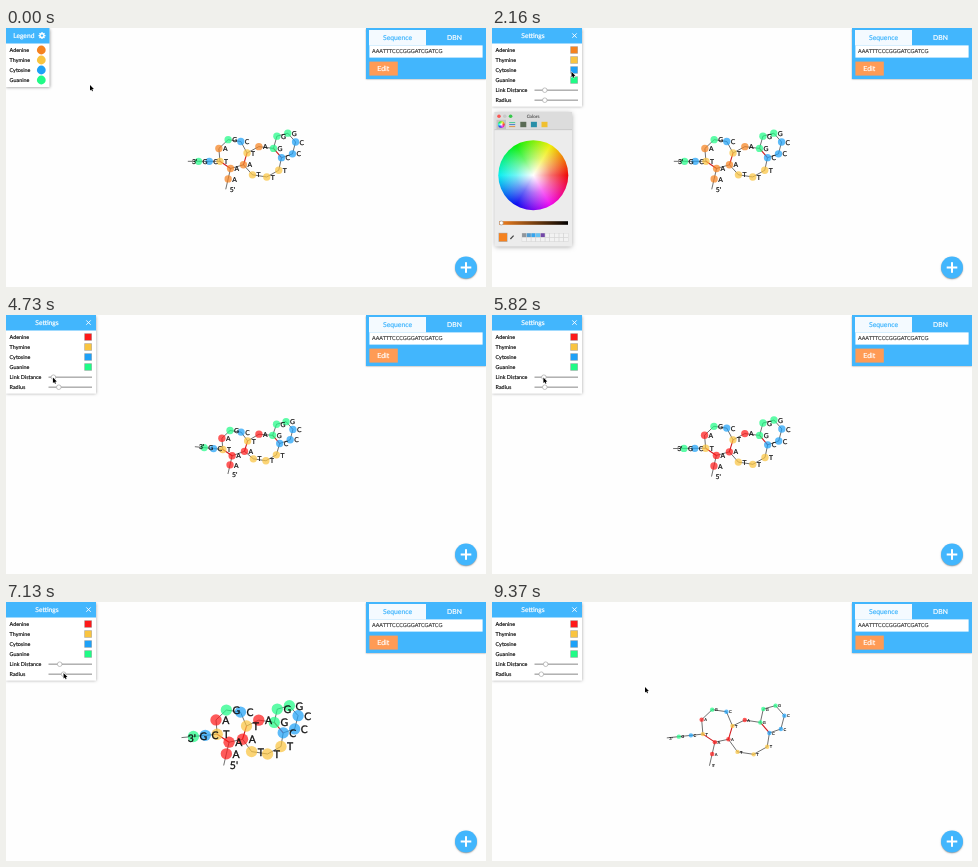
Write an HTML page with a canvas that moves like this. It is 480 by 259 pixels and loops after 9.39 s.

```html
<!DOCTYPE html>
<html lang="en">
<head>
<meta charset="utf-8">
<title>Sequence viewer</title>
<style>
  html, body { margin: 0; width: 100%; height: 100%; overflow: hidden; background: #fefefe; }
  canvas { display: block; width: 480px; height: 259px; }
</style>
</head>
<body>
<canvas id="stage"></canvas>
<script>
const LOOP = 9390;
const canvas = document.getElementById('stage');
const ctx = canvas.getContext('2d');
const scale = window.devicePixelRatio || 1;
canvas.width = 480 * scale;
canvas.height = 259 * scale;
ctx.textRendering = 'geometricPrecision';

const BLUE = '#42b6fd';
const SEQUENCE = 'AAATTTCCCGGGATCGATCG';
const LABELS = ["5'", ...SEQUENCE, "3'"];
const PAIRS = [[2, 18], [3, 14], [7, 12]];
const COLORS = { T: '#f9c440', C: '#1ea1f7', G: '#20fb86' };
const BASES = [['Adenine', 'A'], ['Thymine', 'T'], ['Cytosine', 'C'], ['Guanine', 'G']];

// Each loop of the folded strand is a regular polygon on an ellipse.
// Neighbouring loops share the two bases of a pair; drift is the shift per unit of spread.
const LOOPS = [
  { x: 226.6, y: 125.8, rx: 14.7, ry: 14.8, start: 98, drift: [-1.4, -2.2], bases: [2, 3, 14, 15, 16, 17, 18] },
  { x: 256.8, y: 133.8, rx: 19, ry: 15.5, start: 168, drift: [0.4, 1.4], bases: [3, 4, 5, 6, 7, 12, 13, 14] },
  { x: 278.7, y: 117, rx: 11.2, ry: 12.3, start: 106, drift: [1.4, 0], bases: [7, 8, 9, 10, 11, 12] }
];

const mix = (a, b, u) => a + (b - a) * u;

// Smooth progress from 0 to 1 between two times.
function ease(t, from, to) {
  const u = Math.min(1, Math.max(0, (t - from) / (to - from)));
  return u * u * (3 - 2 * u);
}

function polar(x, y, degrees, rx, ry = rx) {
  const a = degrees * Math.PI / 180;
  return [x + rx * Math.cos(a), y + ry * Math.sin(a)];
}

function rect(x, y, w, h, fill) {
  ctx.fillStyle = fill;
  ctx.fillRect(x, y, w, h);
}

function disc(x, y, r, fill, stroke) {
  ctx.beginPath();
  ctx.arc(x, y, r, 0, Math.PI * 2);
  ctx.fillStyle = fill;
  ctx.fill();
  if (stroke) {
    ctx.strokeStyle = stroke;
    ctx.lineWidth = 0.6;
    ctx.stroke();
  }
}

function line(points, color, width) {
  ctx.beginPath();
  points.forEach(([x, y]) => ctx.lineTo(x, y));
  ctx.strokeStyle = color;
  ctx.lineWidth = width;
  ctx.stroke();
}

function text(str, x, y, size, color, align = 'left') {
  ctx.font = `${size}px Lato, sans-serif`;
  ctx.textAlign = align;
  ctx.fillStyle = ctx.strokeStyle = color;
  ctx.lineWidth = size * 0.03;
  ctx.fillText(str, x, y + size * 0.36);
  ctx.strokeText(str, x, y + size * 0.36);
}

function shadowed(draw, blur) {
  ctx.save();
  ctx.shadowColor = 'rgba(0,0,0,.4)';
  ctx.shadowBlur = blur * scale;
  ctx.shadowOffsetY = 0.7 * scale;
  draw();
  ctx.restore();
}

function layout(spread) {
  const nodes = [];
  const size = 1 + 0.13 * spread;
  for (const { x, y, rx, ry, start, drift, bases } of LOOPS) {
    bases.forEach((base, i) => {
      const p = polar(x + drift[0] * spread, y + drift[1] * spread,
        start - 360 * i / bases.length, rx * size, ry * size);
      const shared = nodes[base];
      nodes[base] = shared ? p.map((v, k) => (v + shared[k]) / 2) : p;
    });
  }
  const step = 10.7 * size;
  for (const i of [1, 0]) nodes[i] = polar(...nodes[i + 1], 103, step);
  for (const i of [19, 20, 21]) nodes[i] = polar(...nodes[i - 1], 180 - 6 * spread, step);
  return nodes;
}

function strand(spread, r, colors) {
  const nodes = layout(spread);
  line(nodes, '#333', 0.7);
  PAIRS.forEach(([a, b]) => line([nodes[a], nodes[b]], '#d0181c', 1.1));
  ctx.globalAlpha = 0.72;
  nodes.forEach(([x, y], i) => {
    if (colors[LABELS[i]]) disc(x, y, r, colors[LABELS[i]]);
  });
  ctx.globalAlpha = 1;
  nodes.forEach(([x, y], i) => text(LABELS[i], x + r * 1.05 + 0.2, y + 0.2, r * 1.85, '#111'));
}

function sequencePanel() {
  shadowed(() => rect(360, 0, 120, 51, BLUE), 1.5);
  rect(363, 2, 57, 15.5, '#f4faff');
  rect(363.4, 17.4, 113.2, 12.2, '#fff');
  text('Sequence', 391.5, 9.5, 6.8, BLUE, 'center');
  text('DBN', 448.5, 9.5, 6.8, '#fff', 'center');
  text(SEQUENCE, 366, 23.5, 5.45, '#444');
  rect(363.4, 33.6, 28.4, 14, '#ff9b55');
  text('Edit', 377.3, 40.7, 7, '#fff', 'center');
}

function addButton() {
  shadowed(() => disc(460, 239.5, 11, BLUE), 1.5);
  rect(454.7, 238.5, 10.6, 2, '#fff');
  rect(459, 234.2, 2, 10.6, '#fff');
}

function panel(w, h, title, titleX) {
  shadowed(() => rect(0, 0, w, h, '#fff'), 3);
  rect(0, 0, w, 15.5, BLUE);
  text(title, titleX, 7.7, 6.7, '#fff', 'center');
}

function legend(colors) {
  panel(43.5, 59, 'Legend', 17.8);
  for (let angle = 0; angle < 180; angle += 45) {
    line([polar(36, 7.6, angle, 3.5), polar(36, 7.6, angle + 180, 3.5)], '#fff', 1.3);
  }
  disc(36, 7.6, 2.6, '#fff');
  disc(36, 7.6, 1.2, BLUE);
  BASES.forEach(([name, base], i) => {
    text(name, 3.6, 22 + 10 * i, 5.4, '#111');
    disc(35.3, 22 + 10 * i, 4.4, colors[base]);
  });
}

function slider(label, y, knob) {
  text(label, 3.6, y, 5.4, '#111');
  rect(42.5, y - 0.7, 43.5, 1.4, '#aaa');
  disc(knob, y, 2.3, '#fff', '#999');
}

function settings(colors, link, radius) {
  panel(90, 78.7, 'Settings', 41);
  line([[80.3, 5.4], [84.7, 9.8]], '#fff', 0.9);
  line([[84.7, 5.4], [80.3, 9.8]], '#fff', 0.9);
  BASES.forEach(([name, base], i) => {
    const y = 22 + 10 * i;
    text(name, 3.6, y, 5.4, '#111');
    rect(78.3, y - 3.7, 7.6, 7.4, '#aaa');
    rect(78.8, y - 3.2, 6.6, 6.4, colors[base]);
  });
  slider('Link Distance', 62.2, link);
  slider('Radius', 72.2, radius);
}

function colorWheel(x, y, r) {
  const hues = ctx.createConicGradient(0, x, y);
  for (let i = 0; i <= 12; i++) hues.addColorStop(i / 12, `hsl(${360 - 30 * i} 95% 48%)`);
  disc(x, y, r, hues);
  const white = ctx.createRadialGradient(x, y, 0, x, y, r);
  white.addColorStop(0, '#fff');
  white.addColorStop(0.5, 'rgba(255,255,255,.42)');
  white.addColorStop(1, 'rgba(255,255,255,0)');
  disc(x, y, r, white);
}

function colorPicker(color) {
  shadowed(() => rect(2.5, 84, 77.5, 134.5, '#ececec'), 5);
  rect(2.5, 84, 77.5, 18, '#dcdcdc');
  rect(2.5, 101.6, 77.5, 0.5, '#b5b5b5');
  ['#fc5753', '#c8c8c8', '#34c84a'].forEach((c, i) => disc(7 + 5.8 * i, 88.2, 1.8, c));
  text('Colors', 41, 88.3, 4.5, '#555', 'center');

  rect(4.5, 91.8, 9.5, 9.5, '#c2c2c2');
  colorWheel(9.3, 96.5, 3.2);
  ['#55cc99', '#5588cc', '#dd9955'].forEach((c, i) => rect(17.2, 94 + 2 * i, 6, 1.1, c));
  ['#5a6b55', '#298fa8', '#f0c030'].forEach((c, i) => rect(28.3 + 10.6 * i, 93.8, 6, 5.4, c));

  colorWheel(41.3, 147.2, 35);

  const shade = ctx.createLinearGradient(7, 0, 76, 0);
  shade.addColorStop(0, color);
  shade.addColorStop(1, '#000');
  rect(7, 193.2, 69, 3.6, shade);
  disc(9.3, 195, 2, '#fff', '#999');

  rect(6.5, 204.8, 9, 9, '#aaa');
  rect(7, 205.3, 8, 8, color);
  line([[18.4, 211], [21.6, 207.6]], '#444', 1.2);
  const swatches = ['#8f959b', '#4f9bd0', '#35a4ee', '#63c3f5', '#7347a8'];
  for (let i = 0; i < 20; i++) {
    const x = 29.8 + 4.65 * (i % 10), y = 205 + 4.4 * Math.floor(i / 10);
    rect(x, y, 4.65, 4.4, '#ccc');
    rect(x + 0.3, y + 0.3, 4.05, 3.8, swatches[i] || '#f2f2f2');
  }
}

// Each move eases the pointer to a place; the knobs are followed while they are dragged.
function pointer(t, link, radius) {
  const moves = [
    [20, 420, 36, 7], [600, 910, 70, 45], [1080, 1170, 198, 110], [1390, 1700, 81, 20],
    [2050, 2450, 73, 146], [2940, 3160, 5.5, 82], [3400, 3870, 48, 62],
    [3920, 4180, link - 0.5, 62.5], [6150, 6350, radius, 71], [9180, 9370, 153, 85]
  ];
  return moves.reduce(([px, py], [from, to, x, y]) => {
    const u = ease(t, from, to);
    return [mix(px, x, u), mix(py, y, u)];
  }, [84, 57]);
}

function cursor(x, y) {
  ctx.beginPath();
  [[0, 0], [0, 5.6], [1.3, 4.5], [2.1, 6.3], [3, 5.9], [2.2, 4.2], [3.9, 4.1]]
    .forEach(([dx, dy]) => ctx.lineTo(x + dx, y + dy));
  ctx.closePath();
  ctx.strokeStyle = '#fff';
  ctx.lineWidth = 0.9;
  ctx.stroke();
  ctx.fillStyle = '#000';
  ctx.fill();
}

function draw(t) {
  const link = 52.8 - 8 * ease(t, 4200, 5060) + 8.9 * ease(t, 5160, 6090);
  const radius = 52.8 + 5.2 * ease(t, 6450, 7280) - 10.5 * ease(t, 7300, 8010)
    + 1.8 * ease(t, 8110, 8510);
  const spread = -1.2 * ease(t, 4200, 4950) + 2.1 * ease(t, 5160, 6300)
    + 0.1 * ease(t, 7080, 8010);
  const red = ease(t, 2350, 2650);
  const adenine = `rgb(${mix(245, 253, red)}, ${mix(130, 26, red)}, ${mix(32, 26, red)})`;
  const colors = { ...COLORS, A: adenine };

  ctx.setTransform(scale, 0, 0, scale, 0, 0);
  rect(0, 0, 480, 259, '#fefefe');
  strand(spread, 2.2 + (radius - 49.3) * 0.42, colors);
  sequencePanel();
  addButton();
  if (t < 500) legend(colors);
  else settings(colors, link, radius);
  if (t >= 1800 && t < 3320) colorPicker(adenine);
  cursor(...pointer(t, link, radius));
}

const start = performance.now();
function frame() {
  draw((performance.now() - start) % LOOP);
  requestAnimationFrame(frame);
}
frame();
</script>
</body>
</html>
```
